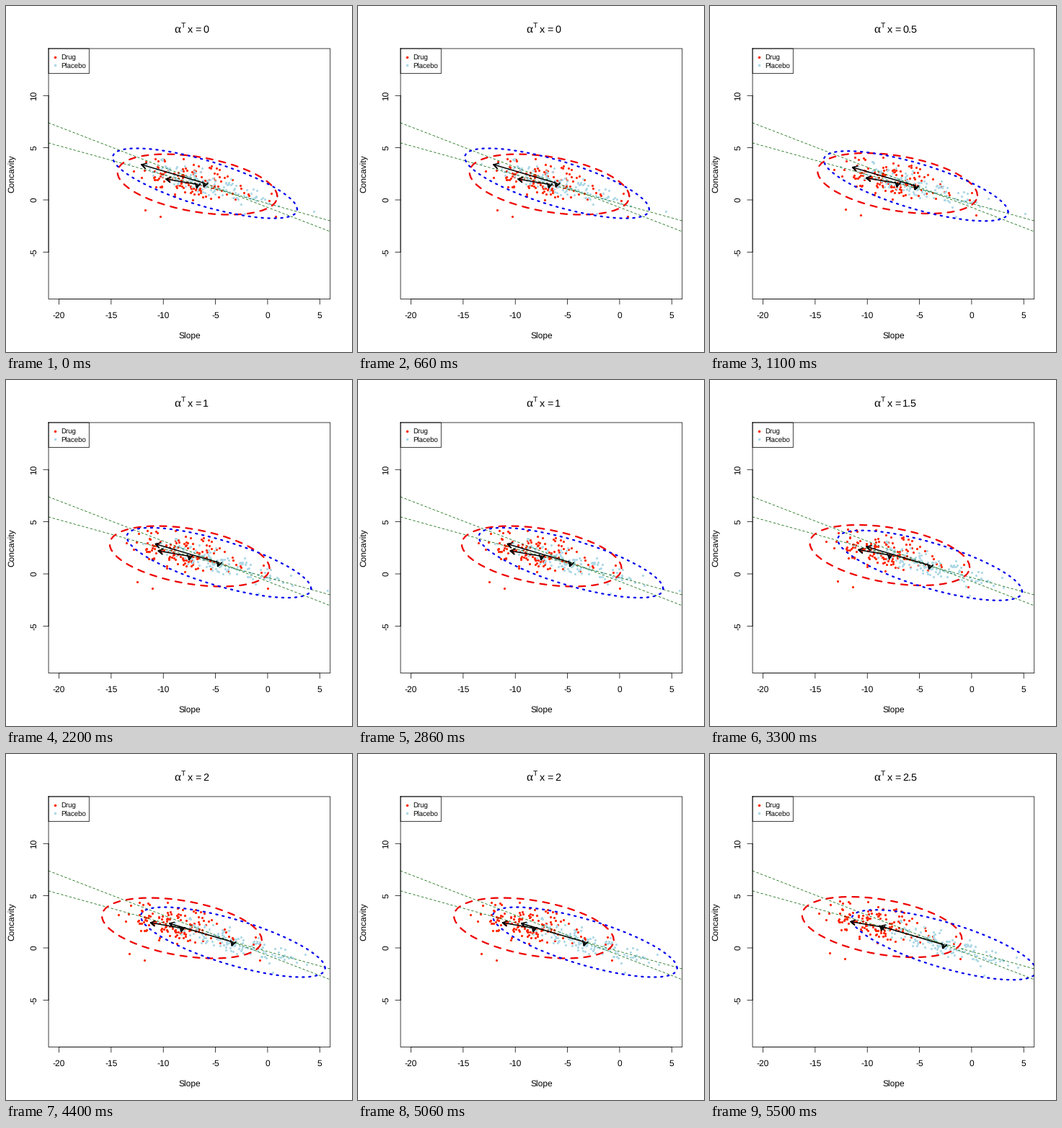
Recreate the animation shown at these times as a matplotlib script. Size 480 px wide and 480 px high, loop 6600 ms.

```python
import numpy as np
import matplotlib.pyplot as plt
from matplotlib.animation import FuncAnimation
from matplotlib.patches import Rectangle

plt.rcParams["text.hinting"] = "no_hinting"

PT = 0.9                      # points per pixel at 80 dpi
LEFT, RIGHT, TOP, BOTTOM = 59.04, 449.76, 59.04, 406.56
UNIT, X0, Y0 = 14.471, 362.93, 269.0
SANS = "Liberation Sans"
RED, PALE = "#ff2600", "#add8e6"

fig = plt.figure(figsize=(6, 6), dpi=80, facecolor="white")
ax = fig.add_axes([0, 0, 1, 1])
ax.set(xlim=(0, 480), ylim=(480, 0))
ax.axis("off")
area = Rectangle((LEFT, TOP), RIGHT - LEFT, BOTTOM - TOP,
                 fc="none", ec="none")
ax.add_patch(area)


def px(x):
    return X0 + UNIT * x


def py(y):
    return Y0 - UNIT * y


def line(xs, ys, width=0.75, color="black", clip=False, **kw):
    art, = ax.plot(xs, ys, color=color, lw=width * PT, snap=False, **kw)
    if clip:
        art.set_clip_path(area)
    return art


def frame_box(x0, y0, x1, y1):
    line([x0, x1, x1, x0, x0], [y0, y0, y1, y1, y0], zorder=6)


def label(x, y, s, size=12, ha="center", rot=0, font=SANS):
    return ax.text(x, y, s, fontsize=size * PT, ha=ha, va="baseline",
                   rotation=rot, rotation_mode="anchor", family=font,
                   color="black", zorder=7)


def dots(xy, color, z, size=3.2):
    art = ax.scatter(xy[:, 0], xy[:, 1], s=(size * PT) ** 2, c=color,
                     linewidths=0, zorder=z)
    art.set_clip_path(area)
    return art


def cloud(seed, n, mean, sd, slope, noise, outliers):
    """Tilted normal scatter without tails, plus a few far points."""
    rng = np.random.default_rng(seed)
    u, v = rng.normal(size=(2, 3 * n))
    keep = np.flatnonzero(u ** 2 + v ** 2 < 4.4)[:n]
    dx = sd * u[keep]
    dy = slope * dx + noise * v[keep]
    return np.vstack([np.column_stack([dx, dy]) + mean, outliers])


def arrow(vec, length=7.2):
    """Shaft from the origin to vec, then an open head."""
    back = -vec / np.hypot(*vec) * length
    c, s = np.cos(np.pi / 6), np.sin(np.pi / 6)
    barbs = [np.array([[c, -k * s], [k * s, c]]) @ back for k in (1, -1)]
    return np.array([(0, 0), vec, vec + barbs[0], vec, vec + barbs[1]])


def ellipse(w, h, rho):
    t = np.linspace(0, 2 * np.pi, 52)
    return np.column_stack([
        w * np.cos(t),
        h * (rho * np.cos(t) - np.sqrt(1 - rho ** 2) * np.sin(t))])


class Group:
    """Points, ellipse and two axis arrows that slide together."""

    def __init__(self, xy, center, step, ring, major, minor,
                 color, dash, dot, z):
        self.xy, self.step = xy, np.array(step)
        self.points = dots(xy, dot, z)
        self.shapes = [(ring + center,
                        line([], [], 2.25, color, True, ls=(0, dash),
                             dash_capstyle="round", zorder=4))]
        major = np.array(major)
        side = np.array([major[1], -major[0]]) / np.hypot(*major) * minor
        for vec in (major, side):
            art = line([], [], 1.5, clip=True, zorder=5,
                       solid_capstyle="round", solid_joinstyle="round")
            self.shapes.append((arrow(vec) + center, art))

    def move(self, k):
        shift = self.step * k
        self.points.set_offsets(self.xy + shift)
        for pts, art in self.shapes:
            art.set_data(*(pts + shift).T)
        return [self.points] + [art for _, art in self.shapes]


# axes
frame_box(LEFT, TOP, RIGHT, BOTTOM)
line([px(-20), px(5)], [BOTTOM, BOTTOM], zorder=6)
line([LEFT, LEFT], [py(-5), py(10)], zorder=6)
for v in range(-20, 6, 5):
    line([px(v)] * 2, [BOTTOM, BOTTOM + 7.2], zorder=6)
    label(px(v), 433, str(v))
for v in range(-5, 11, 5):
    line([LEFT, LEFT - 7.2], [py(v)] * 2, zorder=6)
    label(42, py(v), str(v), rot=90)
label(254.4, 462, "Slope")
label(12.4, 232.8, "Concavity", rot=90)

# legend
frame_box(LEFT, TOP, 115.3, 93.6)
for y, name, color in ((70.5, "Drug", RED), (82, "Placebo", PALE)):
    dots(np.array([[67.6, y]]), color, 6, 3.6)
    label(76, y + 3.5, name, 9.6, "left")

# fixed guide lines
ends = np.array([-21, 6])
for a, b in ((-0.72, -0.386), (-0.345, -0.2764)):
    line(px(ends), py(a + b * ends), 0.75, "#006400", True,
         ls=(0, (4, 4)), dash_capstyle="round", zorder=3)

drug = Group(
    cloud(5, 135, (259, 242), 41, 0.2, 13.5,
          [(193, 283), (214, 291.5), (374, 291.5), (365, 270), (368, 260)]),
    center=(265.5, 247.5), step=(-5.38, -1.49),
    ring=ellipse(110.9, 42, 0.40), major=(-43.5, -7.5), minor=4.7,
    color="#ee0000", dash=(4, 4), dot=RED, z=1)
placebo = Group(
    cloud(8, 130, (277, 245), 45, 0.29, 9.5,
          [(427, 284.5), (376, 263), (378, 277), (331, 288), (171, 219)]),
    center=(276, 246), step=(9.7, 3.75),
    ring=ellipse(128, 48.6, 0.7415), major=(-88, -26), minor=5,
    color="#0000ee", dash=(1, 3), dot=PALE, z=2)

# title pieces with their offsets from the left end
PIECES = ((0, label(0, 37, "\u03b1", 17, "left", font="Liberation Serif")),
          (9.4, label(0, 30, "T", 10.4, "left")),
          (19, label(0, 37, "x", 14.4, "left")),
          (29.2, label(0, 37, "=", 14.4, "left")))
number = label(0, 37, "", 14.4, "left")


def draw(k):
    value = f"{k / 2:g}"
    left = 236 - 3 * len(value)
    for dx, art in PIECES:
        art.set_x(left + dx)
    number.set_x(left + 40.1)
    number.set_text(value)
    return drug.move(k) + placebo.move(k) + [number]


anim = FuncAnimation(fig, draw, frames=6, interval=1100,
                     init_func=lambda: draw(0), repeat=True, blit=False)
plt.show()
```
